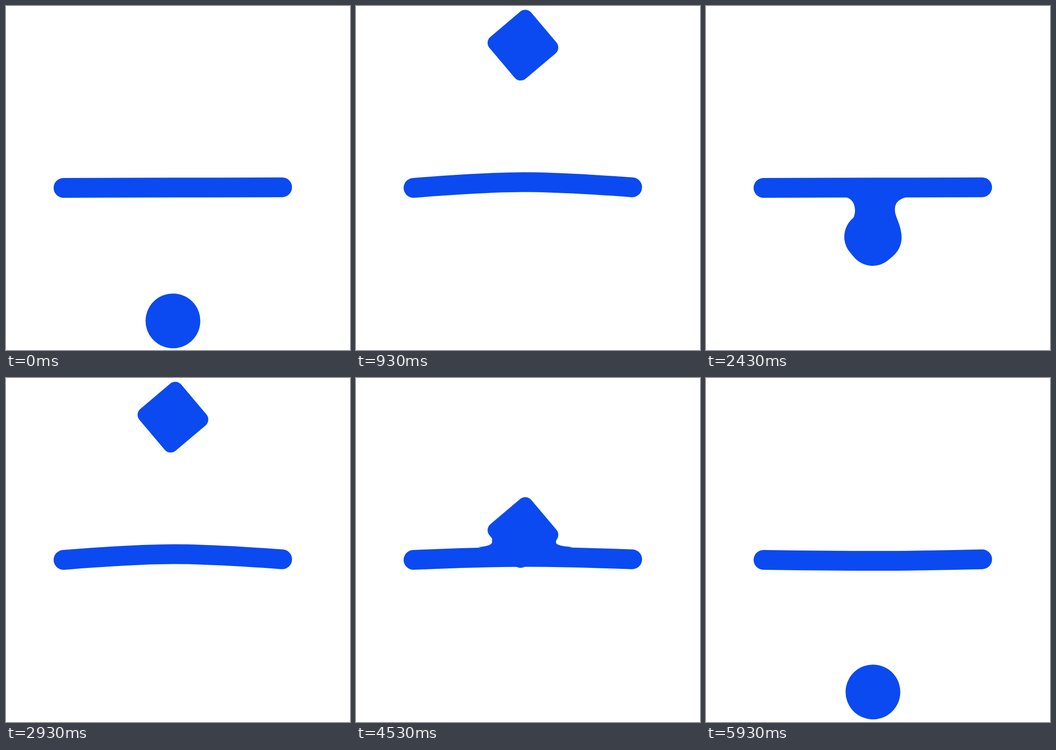
An HTML page with a canvas for the animation above (6010 ms loop, 748 by 748 pixels).

```html
<!DOCTYPE html>
<html>
<head>
<meta charset="utf-8">
<style>
html, body { margin: 0; width: 100%; height: 100%; overflow: hidden; background: #fff; }
canvas { display: block; }
</style>
</head>
<body>
<canvas id="stage" width="748" height="748"></canvas>
<script>
const ctx = document.getElementById('stage').getContext('2d');
const LOOP = 6010, CYCLE = 2000, APEX = 967;
const CX = 363, LOW = 684.7, HIGH = 84.5;
const BAR = { x0: 125, y0: 395.5, x1: 600.5, y1: 394.2, w: 43 };

const lerp = (a, b, k) => a + (b - a) * k;
const clamp = k => Math.max(0, Math.min(1, k));
const smooth = k => k * k * (3 - 2 * k);

// Bezier ease with handles (x1, 0) and (x2, 1)
function ease(x, x1, x2) {
  let lo = 0, hi = 1;
  for (let i = 0; i < 30; i++) {
    const u = (lo + hi) / 2, v = 1 - u;
    if (3 * v * v * u * x1 + 3 * v * u * u * x2 + u * u * u < x) lo = u; else hi = u;
  }
  return smooth(lo);
}

function ballY(t) {
  return t < APEX
    ? lerp(LOW, HIGH, ease(t / APEX, 0.688, 0.374))
    : lerp(HIGH, LOW, ease((t - APEX) / (CYCLE - APEX), 0.235, 0.333));
}

// 0 = circle, 1 = rounded diamond
function shapeMix(t) {
  return t < APEX ? smooth(clamp((t - 400) / 130)) : 1 - smooth(clamp((t - 1300) / 150));
}

const wobble = [
  [0, 0], [467, 0], [600, -12], [767, 13.5], [933, -11.8], [1133, 0],
  [1333, 0], [1467, 13], [1633, -12], [1800, 13.3], [1988, 0], [2000, 0]
];

function bend(t) {
  const i = Math.max(1, wobble.findIndex(p => p[0] >= t));
  const [ta, a] = wobble[i - 1], [tb, b] = wobble[i];
  return lerp(a, b, smooth((t - ta) / (tb - ta)));
}

function drawBar(dy) {
  const mx = 365, my = (BAR.y0 + BAR.y1) / 2 + dy;
  ctx.lineWidth = BAR.w;
  ctx.lineCap = 'round';
  ctx.beginPath();
  ctx.moveTo(BAR.x0, BAR.y0);
  ctx.bezierCurveTo(BAR.x0, BAR.y0, mx - 90, my, mx, my);
  ctx.bezierCurveTo(mx + 90, my, BAR.x1, BAR.y1, BAR.x1, BAR.y1);
  ctx.stroke();
}

function drawBall(y, mix) {
  const h = 59.5;
  ctx.save();
  ctx.translate(CX, y);
  ctx.rotate(49.8 * Math.PI / 180);
  ctx.beginPath();
  ctx.roundRect(-h, -h, 2 * h, 2 * h, lerp(h, 17, mix));
  ctx.fill();
  ctx.restore();
}

// Liquid neck between the ball and the bar
function drawNeck(y, mix, dy) {
  const mid = 394.7 + dy, side = y < mid ? 1 : -1;
  const edge = mid - side * BAR.w / 2;
  const gap = (edge - y) * side;
  if (gap < 4 || gap > 120) return;
  const k = clamp((120 - gap) / 38), near = clamp(gap / 80), wide = lerp(0.79, 1, mix);
  const left = lerp(76, 53.5, near) * k, right = lerp(76, 65.5, near) * k;
  const X = d => CX + d * wide, Y = f => lerp(y, edge, f);
  ctx.beginPath();
  ctx.moveTo(X(-75), Y(0.03 * mix));
  ctx.bezierCurveTo(X(lerp(-75, -64, mix)), Y(0.22), X(-left), Y(0.42), X(-left), Y(0.66));
  ctx.bezierCurveTo(X(-left), Y(0.87), X(-left - 12 * k), Y(0.98), X(-left - 30 * k), Y(1.01));
  ctx.lineTo(CX, mid);
  ctx.lineTo(X(right + 36 * k), Y(1.01));
  ctx.bezierCurveTo(X(right + 14 * k), Y(0.96), X(right), Y(0.88), X(right), Y(0.69));
  ctx.bezierCurveTo(X(right), Y(0.5), X(75), Y(0.32), X(75), Y(0.1 * mix));
  ctx.closePath();
  ctx.fill();
}

function draw(now) {
  const ms = now % LOOP;
  // Stepped playback: two poses per 100 ms
  const step = Math.min(5933, Math.floor(ms / 100) * 100 + (ms % 100 < 30 ? 0 : 33));
  const t = step % CYCLE;
  const y = ballY(t), mix = shapeMix(t), dy = bend(t);
  ctx.fillStyle = '#fff';
  ctx.fillRect(0, 0, 748, 748);
  ctx.fillStyle = ctx.strokeStyle = '#0a4af0';
  drawBar(dy);
  drawNeck(y, mix, dy);
  drawBall(y, mix);
}

const start = performance.now();
function tick() {
  draw(performance.now() - start);
  requestAnimationFrame(tick);
}
tick();
</script>
</body>
</html>
```
